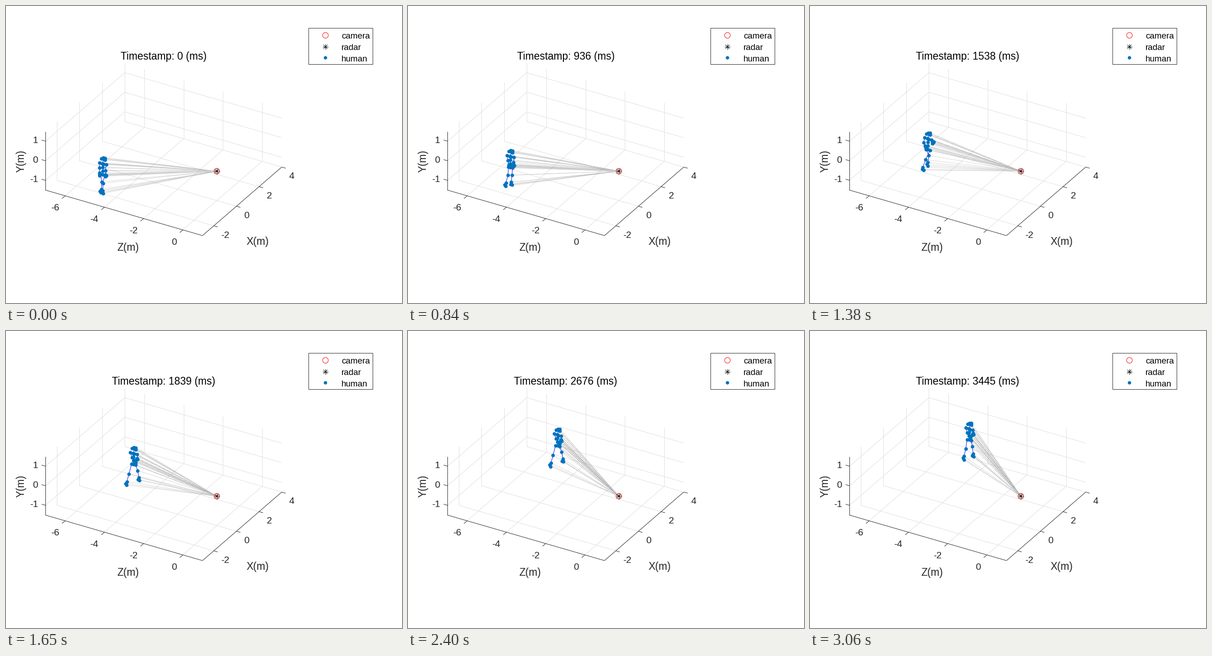
A matplotlib script that plays this animation: 864 by 648 pixels, repeating every 3.09 s.

```python
import numpy as np
import matplotlib.pyplot as plt
from matplotlib.animation import FuncAnimation
from matplotlib.collections import LineCollection
from matplotlib.patches import Circle, Rectangle

W, H, DPI = 864, 648, 100
FRAMES, STEP = 103, 30
PERIOD, DROP = 33.445, 91          # sensor period in ms, one sample lost after DROP
INK, GRID, BLUE = "#262626", "#dfdfdf", "#0072bd"
PX = 72 / DPI

plt.rcParams["font.family"] = "Liberation Sans"
fig = plt.figure(figsize=(W / DPI, H / DPI), dpi=DPI, facecolor="white")
ax = fig.add_axes([0, 0, 1, 1])
ax.set_xlim(0, W)
ax.set_ylim(H, 0)
ax.axis("off")


def project(x, y, z):
    return np.array([460 + 24.7 * x + 42.8 * z,
                     360.4 - 21.36 * x + 12.4 * z - 42.7 * y])


def line(a, b, color=INK, z=1):
    ax.plot([a[0], b[0]], [a[1], b[1]], color=color, lw=PX, zorder=z,
            solid_capstyle="butt")


def label(x, y, text, size, color=INK, ha="center", **kw):
    return ax.text(x, y, text, fontsize=size * PX, color=color, ha=ha,
                   va="baseline", **kw)


# ---- axes box -------------------------------------------------------------
X0, X1, Y0, Y1, Z0, Z1 = -3, 4, -1.5, 1.5, -7, 1
XT, YT, ZT = (-2, 0, 2, 4), (-1, 0, 1), (-6, -4, -2, 0)

for x in XT:
    line(project(x, Y0, Z0), project(x, Y0, Z1), GRID)
    line(project(x, Y0, Z0), project(x, Y1, Z0), GRID)
for z in ZT:
    line(project(X0, Y0, z), project(X1, Y0, z), GRID)
    line(project(X1, Y0, z), project(X1, Y1, z), GRID)
for y in YT:
    line(project(X0, y, Z0), project(X1, y, Z0), GRID)
    line(project(X1, y, Z0), project(X1, y, Z1), GRID)

line(project(X0, Y1, Z0), project(X0, Y0, Z0), z=2)
line(project(X0, Y0, Z0), project(X0, Y0, Z1), z=2)
line(project(X0, Y0, Z1), project(X1, Y0, Z1), z=2)

along_x = 9 * np.array([-0.756, 0.654])
along_z = 9 * np.array([0.96, 0.278])
for x in XT:
    p = project(x, Y0, Z1)
    line(p, p + along_z, z=2)
    label(p[0] + (22 if x >= 0 else 25), p[1] + 26, str(x), 20.5)
for z in ZT:
    p = project(X0, Y0, z)
    line(p, p + along_x, z=2)
    label(p[0] - (18.5 if z == 0 else 22), p[1] + 32, str(z), 20.5)
for y in YT:
    p = project(X0, y, Z0)
    line(p, p - along_z, z=2)
    label(70, p[1] + 4, str(y), 20.5, ha="right")

label(266.5, 534, "Z(m)", 22.6)
label(548.5, 521.5, "X(m)", 22.6)
label(39.5, 338.5, "Y(m)", 22.6, rotation=90, rotation_mode="anchor")
title = label(344, 117, "", 22.6, "black")


# ---- markers and legend ---------------------------------------------------
def ring(x, y):
    ax.add_patch(Circle((x, y), 6.2, fill=False, ec="red", lw=PX, zorder=8))


def star(x, y):
    for dx, dy in ((6.2, 0), (0, 6.2), (4.4, 4.4), (4.4, -4.4)):
        line((x - dx, y - dy), (x + dx, y + dy), "black", 9)


RADAR = project(0, 0, 0)
ring(*RADAR)
star(*RADAR)

ax.add_patch(Rectangle((660, 48), 140, 79, fc="white", ec=INK, lw=PX, zorder=7))
ring(697, 64)
star(697, 89)
ax.add_patch(Circle((697, 113), 3.7, color=BLUE, lw=0, zorder=8))
for y, name in ((71, "camera"), (96, "radar"), (121, "human")):
    label(732, y, name, 18.6, "black", "left", zorder=8)

# ---- walking figure -------------------------------------------------------
KEYS = np.array([0, 18, 38, 55, 68, 80, 102])
PATH = np.array([(210.5, 367.5), (213, 363), (241, 333), (278, 290.5),
                 (308, 270.5), (326, 250), (347, 237)])
STRIDE = 12.5                      # frames per step


def slopes(p):
    """Monotone tangents: smooth motion that never overshoots a key."""
    d = np.diff(p, axis=0) / np.diff(KEYS)[:, None]
    a, b = d[:-1], d[1:]
    return np.vstack([0 * d[:1], 2 * a * b / (a + b), d[-1:] / 2])


SLOPES = slopes(PATH)


def pelvis_at(k):
    i = min(np.searchsorted(KEYS, k, side="right") - 1, len(KEYS) - 2)
    h = KEYS[i + 1] - KEYS[i]
    t = (k - KEYS[i]) / h
    s = t * t * (3 - 2 * t)
    return (PATH[i] * (1 - s) + PATH[i + 1] * s
            + h * t * (1 - t) * ((1 - t) * SLOPES[i] - t * SLOPES[i + 1]))


def smooth(t):
    t = np.clip(t, 0, 1)
    return t * t * (3 - 2 * t)


OFFSETS = dict(
    clavL=("neck", -1, 0), clavR=("neck", 2, 1.5),
    shoulderL=("neck", -7, -2), shoulderR=("neck", 8, 2.5),
    head=("neck", 2, -10), earL=("neck", -3, -10.5), eyeL=("neck", 1, -12.5),
    eyeR=("neck", 5, -12), nose=("neck", 5, -8),
    hipL=("pelvis", -4, -0.5), hipR=("pelvis", 4.5, 1.5),
    heelL=("ankleL", -2.5, 4), toeL=("ankleL", -0.5, 7.5),
    heelR=("ankleR", -1.5, 4.5), toeR=("ankleR", 1.5, 6),
)
CHAINS = ["pelvis navel chest neck head",
          "chest clavL shoulderL elbowL wristL handL tipL", "wristL thumbL",
          "chest clavR shoulderR elbowR wristR handR tipR", "wristR thumbR",
          "pelvis hipL kneeL ankleL toeL", "ankleL heelL",
          "pelvis hipR kneeR ankleR toeR", "ankleR heelR"]
BONES = [pair for c in CHAINS for pair in zip(c.split(), c.split()[1:])]


def pose(k):
    pace = smooth((k - 10) / 40)                       # standing -> walking
    swing = pace * np.cos(np.pi * (k - KEYS[3]) / STRIDE)
    lag = 10 * np.exp(-((k - 38) / 9) ** 2)            # legs trail at take-off
    pelvis = pelvis_at(k)
    neck = pelvis + (0, -24)
    j = dict(pelvis=pelvis, neck=neck,
             navel=pelvis + (0, -8), chest=pelvis + (0, -16))

    for side, s, x in (("L", -swing, -1.5), ("R", swing, 1.5)):
        j["knee" + side] = pelvis + (x + 8 * s - 0.3 * lag, 17.5 + x - 5 * s)
        j["ankle" + side] = pelvis + (x - 1 + 11.5 * s - lag, 33.5 + x - 6 * s)

    # arms swing against the legs, the right one bent further
    j["elbowL"] = neck + (-7 + 4 * swing, 9)
    j["handL"] = neck + (-7 + 5 * pace + 5 * swing, 23 - 5 * pace)
    j["elbowR"] = neck + (6 + 3 * pace - swing, 15 - 4 * pace)
    j["handR"] = neck + (6 + 4 * pace - 3 * swing, 26 - 16 * pace + 3 * swing)

    for name, (base, dx, dy) in OFFSETS.items():
        j[name] = j[base] + (dx, dy)
    for side, reach in (("L", 3), ("R", 2)):
        hand = j["hand" + side]
        arm = hand - j["elbow" + side]
        u = arm / max(np.hypot(*arm), 1) * reach
        j["wrist" + side] = hand - u
        j["tip" + side] = hand + u
        j["thumb" + side] = hand + (u[1], -u[0])
    return j


rays = LineCollection([], colors="#8a8a8a", linewidths=PX,
                      linestyles=[(0, (1, 2))], zorder=4)
bones = LineCollection([], colors="blue", linewidths=PX, zorder=5)
ax.add_collection(rays, autolim=False)
ax.add_collection(bones, autolim=False)
dots, = ax.plot([], [], "o", ms=7.7 * PX, color=BLUE, mew=0, zorder=6)


def draw(k):
    j = pose(k)
    pts = np.array(list(j.values()))
    rays.set_segments([(RADAR, p) for p in pts])
    bones.set_segments([(j[a], j[b]) for a, b in BONES])
    dots.set_data(pts[:, 0], pts[:, 1])
    sample = k + (k > DROP)
    title.set_text(f"Timestamp: {round(sample * PERIOD)} (ms)")
    return rays, bones, dots, title


anim = FuncAnimation(fig, draw, frames=FRAMES, interval=STEP, repeat=True,
                     repeat_delay=0)
plt.show()
```
